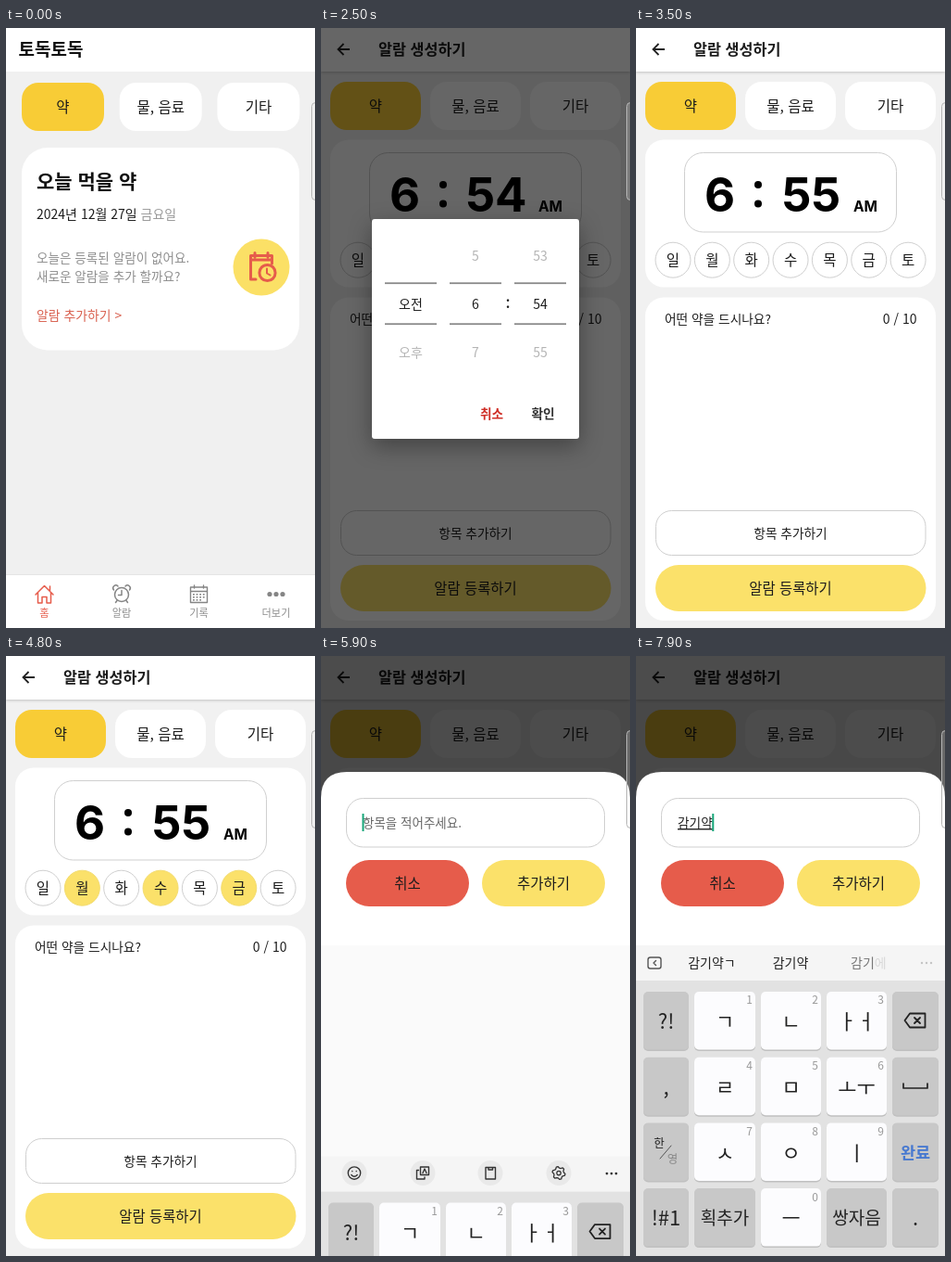
An HTML page that plays this animation: 334 px wide and 647 px high, repeating every 8000 ms.

```html
<!DOCTYPE html>
<html lang="ko">
<head>
<meta charset="utf-8">
<style>
html, body { margin: 0; width: 100%; height: 100%; overflow: hidden; background: #f0f0f0; }
svg { display: block; width: 334px; height: 647px; font-family: "Noto Sans CJK KR", "Noto Sans CJK", sans-serif; }
.inter { font-family: Inter, sans-serif; }
.shade { filter: drop-shadow(0 1px 1.5px rgba(0,0,0,.2)); }
.float { filter: drop-shadow(0 8px 12px rgba(0,0,0,.35)); }
</style>
</head>
<body>
<svg id="stage" viewBox="0 0 334 647"></svg>
<script>
const LOOP = 8000;
const INK = '#1c1c1c', GRAY = '#8e8e8e', RED = '#e65c4b', AMBER = '#f8cc36', YELLOW = '#fbe16a', LINE = '#cfcfcf';
const stage = document.getElementById('stage');

// ---- drawing helpers ----
function el(parent, tag, attrs = {}, content) {
  const node = document.createElementNS('http://www.w3.org/2000/svg', tag);
  for (const key in attrs) node.setAttribute(key, attrs[key]);
  if (content !== undefined) node.textContent = content;
  return parent.appendChild(node);
}
const group = (parent, attrs) => el(parent, 'g', attrs);
const box = (parent, x, y, right, bottom, r, fill, attrs) =>
  el(parent, 'rect', { x, y, width: right - x, height: bottom - y, rx: r, fill, ...attrs });
const outline = (parent, x, y, right, bottom, r) =>
  box(parent, x + .5, y + .5, right - .5, bottom - .5, r, '#fff', { stroke: LINE });
const disc = (parent, cx, cy, r, fill, attrs) => el(parent, 'circle', { cx, cy, r, fill, ...attrs });
const stroke = (parent, d, color, width = 1.5, attrs) =>
  el(parent, 'path', { d, fill: 'none', stroke: color, 'stroke-width': width, 'stroke-linecap': 'round', 'stroke-linejoin': 'round', ...attrs });
// y is the optical middle of the line
const label = (parent, x, y, content, size, fill = INK, attrs) =>
  el(parent, 'text', { x, y: y + size * .37, 'font-size': size, fill, ...attrs }, content);
const centered = (parent, x, y, content, size, fill, attrs) =>
  label(parent, x, y, content, size, fill, { 'text-anchor': 'middle', ...attrs });
const bold = { 'font-weight': 700 }, medium = { 'font-weight': 500 };
const set = (node, attrs) => { for (const key in attrs) node.setAttribute(key, attrs[key]); };
const show = (node, on) => node.setAttribute('visibility', on ? 'visible' : 'hidden');

function tabs(parent, x, pitch, width, y) {
  ['약', '물, 음료', '기타'].forEach((name, i) => {
    const left = x + i * pitch;
    box(parent, left, y, left + width, y + 52, 18, i ? '#fff' : AMBER);
    centered(parent, left + width / 2, y + 26, name, 15.5, INK, medium);
  });
}

// ---- home screen ----
const home = group(stage);
box(home, 0, 0, 334, 647, 0, '#f0f0f0');
box(home, 0, 0, 334, 47, 0, '#fff');
label(home, 13.5, 23, '토독토독', 19, '#111', bold);
tabs(home, 17, 105.7, 89, 59);
box(home, 17, 129, 317, 347.5, 28, '#fff');
label(home, 33, 165, '오늘 먹을 약', 21, '#111', bold);
const dateLine = label(home, 33, 201, '2024년 12월 27일 ', 14, INK, medium);
el(dateLine, 'tspan', { fill: '#999' }, '금요일');
label(home, 33, 248, '오늘은 등록된 알람이 없어요.', 13.6, GRAY);
label(home, 33, 267.5, '새로운 알람을 추가 할까요?', 13.6, GRAY);
label(home, 33, 310, '알람 추가하기 >', 13.9, '#d9604f', medium);
disc(home, 276, 258, 30.5, '#fbe066');
stroke(home, 'M270 271H264.5V245.5H287.5V254M264.5 250H287.5M269 242.5V247M283 242.5V247', RED, 3);
disc(home, 282.5, 264, 8.6, '#fbe066', { stroke: RED, 'stroke-width': 3 });
stroke(home, 'M282 259.5V264.5L285.5 266.5', RED, 2);

const NAV = '#858585';
box(home, 0, 590, 334, 647, 0, '#fff');
box(home, 0, 589, 334, 590, 0, '#e4e4e4');
stroke(home, 'M32 611L41.5 601.5L51 611M34.5 609V620H39V613.5H44V620H48.5V609M47.5 606.5V602', RED);
disc(home, 125, 611, 7.5, 'none', { stroke: NAV, 'stroke-width': 1.5 });
stroke(home, 'M125 606.5V611.5H121.5M120 617.5L118.5 619.5M130 617.5L131.5 619.5M116.5 606A3 3 0 0 1 121 602M133.5 606A3 3 0 0 0 129 602', NAV);
stroke(home, 'M199.5 603H217.5V619.5H199.5ZM199.5 607.5H217.5M203.5 601V604M213.5 601V604', NAV, 1.4);
for (let i = 0; i < 11; i++) box(home, 202 + i % 4 * 3.6, 610 + (i >> 2) * 3, 203.8 + i % 4 * 3.6, 611.6 + (i >> 2) * 3, 0, NAV);
for (const x of [285, 292, 299]) disc(home, x, 610.5, 2.6, NAV);
['홈', '알람', '기록', '더보기'].forEach((name, i) => centered(home, 41.5 + i * 83.5, 631, name, 11.2, i ? GRAY : RED));

// ---- alarm form ----
const alarm = group(stage);
box(alarm, 0, 0, 334, 647, 0, '#f1f1f1');
box(alarm, 0, 0, 334, 47, 0, '#fff', { class: 'shade' });
stroke(alarm, 'M31 23H18.8M24.5 17L18.5 23L24.5 29', '#222', 1.8, { 'stroke-linecap': 'butt', 'stroke-linejoin': 'miter' });
label(alarm, 62, 23, '알람 생성하기', 16.3, INK, bold);
tabs(alarm, 10, 108, 98, 58);
box(alarm, 10, 120.5, 324, 279.5, 20, '#fff');
outline(alarm, 52, 134, 282, 220.5, 20);
const digits = { class: 'inter', 'font-size': 51, 'font-weight': 700, 'text-anchor': 'middle', y: 198 };
el(alarm, 'text', { ...digits, x: 90.5 }, '6');
const minutes = el(alarm, 'text', { ...digits, x: 189.5 });
disc(alarm, 132, 169, 4, '#000');
disc(alarm, 132, 189.5, 4, '#000');
el(alarm, 'text', { class: 'inter', x: 235, y: 197.5, 'font-size': 15.5, 'font-weight': 700 }, 'AM');
const days = [...'일월화수목금토'].map((name, i) => {
  const x = 40 + i * 42.35;
  const ring = disc(alarm, x, 250.2, 19, '#fff', { stroke: LINE });
  centered(alarm, x, 250.2, name, 15.5, INK, medium);
  return ring;
});
box(alarm, 10, 290.5, 324, 639, 20, '#fff');
label(alarm, 31, 314, '어떤 약을 드시나요?', 13.7, INK, medium);
label(alarm, 303.5, 314, '0 / 10', 14, INK, { 'text-anchor': 'end' });
outline(alarm, 21, 520, 313.5, 569, 17);
centered(alarm, 167, 544.5, '항목 추가하기', 13.7, INK, medium);
box(alarm, 21, 579, 313.5, 629, 25, YELLOW);
centered(alarm, 167, 604, '알람 등록하기', 15.4, INK, medium);

// ---- time picker dialog ----
const pickerDim = box(stage, 0, 0, 334, 647, 0, '#000');
const picker = group(stage);
box(picker, 55, 206, 279, 443, 3, '#fff', { class: 'float' });
const clip = el(el(stage, 'defs'), 'clipPath', { id: 'wheel' });
box(clip, 55, 222, 279, 374, 0, '#000');
const wheels = group(picker, { 'clip-path': 'url(#wheel)' });
const FADED = '#b4b4b4', ROW = 52;
const wheelItem = (x, row, name) => centered(wheels, x, 298 + row * ROW, name, 14, row ? FADED : INK);
wheelItem(97, 0, '오전');
wheelItem(97, 1, '오후');
for (let row = -1; row <= 1; row++) wheelItem(167, row, 6 + row);
const minuteItems = [];
for (let row = -1; row <= 2; row++) minuteItems.push({ row, node: wheelItem(237, row, 54 + row) });
centered(picker, 202, 297.5, ':', 14, INK, bold);
for (const x of [69, 139, 209]) for (const y of [274.3, 318.3]) box(picker, x, y, x + 56, y + 1.8, 0, '#8a8a8a');
centered(picker, 184.5, 416, '취소', 13.7, '#cf2e26', bold);
centered(picker, 240, 416, '확인', 13.7, '#333', bold);

// ---- item entry sheet ----
const sheetDim = box(stage, 0, 0, 334, 647, 0, '#000');
const sheet = group(stage);
el(sheet, 'path', { d: 'M0 187V28Q0 0 28 0H306Q334 0 334 28V187Z', fill: '#fff' });
outline(sheet, 27, 28, 307, 81.5, 18);
const placeholder = label(sheet, 45, 55, '항목을 적어주세요.', 13.5, '#666');
const entry = label(sheet, 45, 55, '', 13.7, INK, { 'text-decoration': 'underline' });
const caret = box(sheet, 0, 45, 2, 64, 0, '#17a679');
box(sheet, 27, 95, 160, 145, 25, RED);
centered(sheet, 93.5, 120, '취소', 15.5, INK, medium);
box(sheet, 174, 95, 307, 145, 25, YELLOW);
centered(sheet, 240.5, 120, '추가하기', 15.5, INK, medium);

// ---- keyboard ----
const keyboardBack = box(stage, 0, 312, 334, 647, 0, '#fafafa');
const keyboard = group(stage);
box(keyboard, 0, 312, 334, 350, 0, '#f5f5f5');
box(keyboard, 0, 350, 334, 647, 0, '#e2e2e2');

const tools = group(keyboard);
for (const x of [36, 110, 183, 257]) disc(tools, x, 330, 13.5, '#e9e9e9');
const DARK = '#333';
disc(tools, 36, 330, 6.7, 'none', { stroke: DARK, 'stroke-width': 1.4 });
stroke(tools, 'M32.8 332Q36 335.5 39.2 332M33.8 328V328.1M38.2 328V328.1', DARK, 1.4);
stroke(tools, 'M107.5 323.5H116.5V332H107.5ZM105.5 327H103.5V336.5H112V334.5M110 330L112 325.5L114 330', DARK, 1.4);
stroke(tools, 'M178 324H188.5V336.5H178ZM181 324V326.5H185.5V324', DARK, 1.4);
disc(tools, 257, 330, 2.2, 'none', { stroke: DARK, 'stroke-width': 1.3 });
const gear = Array.from({ length: 24 }, (_, i) => {
  const a = (i + .5) * Math.PI / 12, r = i % 4 < 2 ? 7 : 5.4;
  return `${257 + r * Math.cos(a)} ${330 + r * Math.sin(a)}`;
});
stroke(tools, 'M' + gear.join('L') + 'Z', DARK, 1.3);
for (const x of [309, 314, 319]) disc(tools, x, 330.5, 1.4, DARK);

const hints = group(keyboard);
box(hints, 13, 325, 27, 337, 2.5, 'none', { stroke: '#555', 'stroke-width': 1.4 });
stroke(hints, 'M21.5 328.5L19 331L21.5 333.5', '#555', 1.4);
const hintWords = [82, 167].map(x => centered(hints, x, 331, '', 14, '#222', medium));
const lastHint = label(hints, 232, 331, '', 14, '#777');
const hintStem = el(lastHint, 'tspan');
el(lastHint, 'tspan', { fill: '#d8d8d8' }, '에');
for (const x of [309, 314, 319]) disc(hints, x, 331, 1.2, '#c4c4c4');

const columns = [[8, 57], [63, 129], [135, 200], [206, 271], [277, 327]];
const rows = [
  ['?!', 'ㄱ', 'ㄴ', 'ㅏㅓ', ''],
  [',', 'ㄹ', 'ㅁ', 'ㅗㅜ', ''],
  ['', 'ㅅ', 'ㅇ', 'ㅣ', '완료'],
  ['!#1', '획추가', 'ㅡ', '쌍자음', '.']
];
rows.forEach((names, r) => names.forEach((name, c) => {
  const [left, right] = columns[c], top = 362 + r * 70.7, middle = (left + right) / 2;
  const light = c === 2 || (r < 3 && c % 4);
  box(keyboard, left, top + 1, right, top + 64, 5, '#c0c0c0');
  box(keyboard, left, top, right, top + 62.5, 5, light ? '#fcfcfe' : '#c8c8c8');
  const size = light ? 22 : name.length > 2 && c ? 19 : name === '완료' ? 17.5 : 22;
  centered(keyboard, middle, top + 32, name, size, name === '완료' ? '#4678d0' : '#222', name === '완료' ? bold : medium);
  if (light) centered(keyboard, right - 6.5, top + 9, r === 3 ? 0 : r * 3 + c, 12, '#999');
}));
stroke(keyboard, 'M290.5 393L296 385.5H312.5V400.5H296ZM301 390L307 396M307 390L301 396', '#222', 1.8);
stroke(keyboard, 'M289 461V466H315V461', '#222', 1.7);
centered(keyboard, 25, 525, '한', 12.5, '#222');
stroke(keyboard, 'M26 542L38 528', '#555', 1);
centered(keyboard, 39.5, 542, '영', 12.5, '#888');

// ---- edge handle, above everything ----
box(stage, 330.5, 80.5, 345, 185.5, 4, '#ededed', { stroke: '#b5b5b5', 'fill-opacity': .2 });

// ---- motion ----
const progress = (t, start, end) => Math.min(1, Math.max(0, (t - start) / (end - start)));
const smooth = p => p * p * (3 - 2 * p);
const easeOut = p => 1 - (1 - p) ** 3;
const DAY_TAPS = { 1: 4000, 3: 4300, 5: 4600 };
const TYPED = ['ㄱ', '가', '감', '감ㄱ', '감기', '감깅', '감기아', '감기야', '감기약'];

function render(t) {
  // critically damped push from the right
  const x = Math.max(0, t - 1130) * .0204;
  const slide = (1 + x) * Math.exp(-x);
  set(home, { transform: `translate(${-100 * (1 - slide)} 0)` });
  set(alarm, { transform: `translate(${334 * slide} 0)` });
  show(alarm, t > 1130);
  show(home, t < 1900);

  minutes.textContent = t < 3250 ? 54 : 55;
  days.forEach((ring, i) => {
    const on = t >= DAY_TAPS[i];
    set(ring, { fill: on ? YELLOW : '#fff', stroke: on ? '#f3dc70' : LINE });
  });

  const opened = easeOut(progress(t, 1950, 2250)), closed = smooth(progress(t, 3250, 3470));
  const scale = .9 + .1 * opened;
  set(pickerDim, { opacity: .6 * opened * (1 - closed) });
  set(picker, { opacity: opened * (1 - closed), transform: `translate(167 324) scale(${scale}) translate(-167 -324)` });
  const turn = smooth(progress(t, 2520, 3000));
  for (const { row, node } of minuteItems)
    set(node, { transform: `translate(0 ${-ROW * turn})`, fill: Math.abs(row - turn) < .45 ? INK : FADED });

  const focused = t >= 5780;
  const raised = easeOut(progress(t, 4830, 5400));
  set(sheetDim, { opacity: .7 * raised });
  set(sheet, { transform: `translate(0 ${focused ? 125 : 647 - 187 * raised})` });
  show(keyboardBack, focused);
  set(keyboard, { transform: `translate(0 ${335 * (1 - smooth(progress(t, 5780, 6100)))})` });

  const count = Math.min(TYPED.length, Math.max(0, Math.floor((t - 6300) / 155) + 1));
  const word = count ? TYPED[count - 1] : '';
  entry.textContent = word;
  show(placeholder, !word);
  show(caret, focused);
  set(caret, { x: 44.5 + (word ? entry.getComputedTextLength() : 0) });
  show(tools, !word);
  show(hints, word);
  hintWords[0].textContent = word + 'ㄱ';
  hintWords[1].textContent = word;
  hintStem.textContent = word.slice(0, 2);
}

const begin = performance.now();
function tick() {
  render((performance.now() - begin) % LOOP);
  requestAnimationFrame(tick);
}
tick();
</script>
</body>
</html>
```
